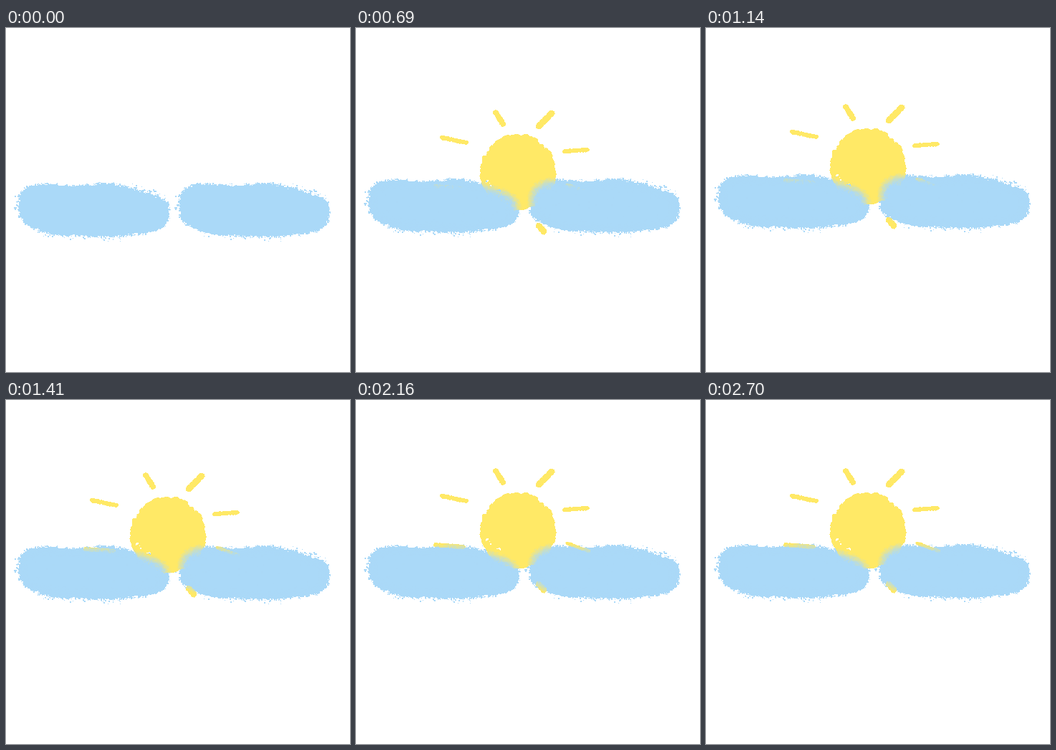
These frames come from a looping animation (480x480 px, 3700 ms). An HTML page with a canvas:

```html
<!DOCTYPE html>
<html lang="en">
<head>
<meta charset="utf-8">
<title>Sun behind clouds</title>
<style>
html, body { margin: 0; width: 100%; height: 100%; overflow: hidden; background: #fff; }
canvas { display: block; width: 480px; height: 480px; }
</style>
</head>
<body>
<canvas id="stage" width="480" height="480"></canvas>
<script>
const SIZE = 480, LOOP = 3700, MOVE_END = 2700, STEP = 30, SUN_IN = 570, SUN_TOP = 1750;
const BLUE = [170, 217, 248], YELLOW = [255, 233, 102];
const CX = 123, CY = 254, HALF = 105, GAP = 224;
const SUN_X = 226, SUN_Y = 182, SUN_R = 53;
const ctx = document.getElementById('stage').getContext('2d');

// Turning points of the cloud: [ms, offset]
const BOB = [[0, 0], [450, -17], [880, 1], [1285, -17], [1720, 2], [2100, -15], [2430, -3], [2700, -15.5]];

// Rays: x1, y1, x2, y2, width
const RAYS = [[195, 99, 205, 115, 8], [255, 118, 273, 100, 9], [120, 134, 154, 141, 6],
              [291, 153, 323, 151, 6], [111, 202, 150, 205, 6], [295, 200, 325, 211, 5],
              [255, 257, 262, 265, 9]];

function hash(x, y) {
  let n = Math.imul(x + 71, 374761393) ^ Math.imul(y + 13, 668265263);
  n = Math.imul(n ^ (n >>> 13), 1274126177);
  return ((n ^ (n >>> 16)) >>> 0) / 4294967296;
}

// Noise around zero in square cells of 2^k pixels
const cells = (x, y, k) => hash(x >> k, y >> k) - 0.5;

// Height of the rounded cloud edge at u = -1..1
const arch = (u, n) => (1 - Math.abs(u) ** n) ** (1 / n);
const topEdge = u => CY - arch(u, u < 0 ? 5 : 2) * (36 + 2 * Math.cos((u + 0.75) * 6.6));
const lowEdge = u => CY + arch(u, u < 0 ? 2.5 : 3) * (37 + Math.sin(u * 9));

function layer(draw, blur) {
  const c = document.createElement('canvas');
  c.width = c.height = SIZE;
  const g = c.getContext('2d');
  g.filter = `blur(${blur}px)`;
  draw(g);
  g.filter = 'none';
  return c;
}

// Recolours a shape, with its alpha passed through a rule
function grain(shape, rgb, rule) {
  const g = shape.getContext('2d');
  const img = g.getImageData(0, 0, SIZE, SIZE), d = img.data;
  for (let i = 0; i < d.length; i += 4) {
    const p = i / 4, a = d[i + 3] / 255;
    d.set(rgb, i);
    d[i + 3] = a ? 255 * rule(a, p % SIZE, Math.floor(p / SIZE)) : 0;
  }
  g.putImageData(img, 0, 0);
  return shape;
}

function drawClouds(g) {
  for (const dx of [0, GAP]) {
    g.beginPath();
    for (let i = -100; i <= 100; i++) g.lineTo(CX + dx + HALF * i / 100, topEdge(i / 100));
    for (let i = 100; i >= -100; i--) g.lineTo(CX + dx + HALF * i / 100, lowEdge(i / 100));
    g.fill();
  }
}

// Loose specks at the left end, the upper right and the lower side
function spray(g) {
  g.fillStyle = `rgb(${BLUE})`;
  const dot = (x, y, s) => {
    for (const dx of [0, GAP]) g.fillRect(Math.round(x) + dx, Math.round(y), s, s);
  };
  for (let i = 0; i < 45; i++) {
    const a = hash(i, 1), b = hash(i, 2), u = 0.5 + 0.5 * a, size = 1 + i % 2;
    dot(CX + HALF * u, topEdge(u) - 8 * b * b, size);
    if (i % 2) dot(20 - 10 * b * b, 230 + 35 * a, size);
    if (i % 3 == 0) dot(CX + HALF * (a * 1.2 - 0.7), lowEdge(a * 1.2 - 0.7) + 6 * b, size);
  }
}

function drawSun(g) {
  g.beginPath();
  for (let a = 0; a < 6.28; a += 0.04) {
    const r = SUN_R + 0.7 * Math.sin(a * 9) + 0.7 * Math.sin(a * 23 + 1);
    g.lineTo(SUN_X + r * Math.cos(a), SUN_Y + r * Math.sin(a));
  }
  g.fill();
  g.lineCap = 'round';
  for (const [x1, y1, x2, y2, w] of RAYS) {
    g.lineWidth = w;
    g.beginPath();
    g.moveTo(x1, y1);
    g.lineTo(x2, y2);
    g.stroke();
  }
  // Notches in the rim, then gaps in the lower left
  g.globalCompositeOperation = 'destination-out';
  for (const a of [3.65, 3.78, -0.75, -0.93]) {
    g.beginPath();
    g.arc(SUN_X + SUN_R * Math.cos(a), SUN_Y + SUN_R * Math.sin(a), 3, 0, 7);
    g.fill();
  }
  for (let i = 0; i < 16; i++) {
    const u = hash(i, 5);
    g.fillRect(Math.floor(180 + 26 * u), Math.floor(190 + 20 * u + 8 * hash(i, 9)), 2, 2);
  }
}

const roughCloud = grain(layer(drawClouds, 2.5), BLUE, (a, x, y) =>
  a + 0.45 * cells(x, y, 1) + 0.3 * cells(x, y, 2) + 0.2 * cells(x, y, 0) > 0.46 ? 1 : 0);
spray(roughCloud.getContext('2d'));

const softCloud = grain(layer(drawClouds, 8), BLUE, (a, x, y) =>
  Math.max(0, Math.min(1, (a - 0.32) / 0.6 + 0.2 * cells(x, y, 1) + 0.15 * cells(x, y, 2))));

const sun = grain(layer(drawSun, 0.8), YELLOW, (a, x, y) => a + 0.3 * cells(x, y, 1) > 0.5 ? 1 : 0);

function bobAt(t) {
  const i = Math.max(1, BOB.findIndex(k => k[0] >= t));
  const [t0, y0] = BOB[i - 1], [t1, y1] = BOB[i];
  const u = (t - t0) / (t1 - t0);
  return y0 + (y1 - y0) * (1 - Math.cos(Math.PI * u)) / 2;
}

function frame() {
  const now = performance.now() % LOOP;
  const t = Math.min(MOVE_END, Math.floor(now / STEP) * STEP);
  const y = Math.round(bobAt(t));
  ctx.clearRect(0, 0, SIZE, SIZE);
  ctx.drawImage(roughCloud, 0, y);
  if (t >= SUN_IN) {
    ctx.drawImage(sun, 0, Math.round(Math.max(0, SUN_TOP - t) * 0.0176));
    // Soft edges tint the sun only where both overlap
    ctx.globalCompositeOperation = 'source-atop';
    ctx.drawImage(softCloud, 0, y);
    ctx.globalCompositeOperation = 'source-over';
  }
  requestAnimationFrame(frame);
}
frame();
</script>
</body>
</html>
```
